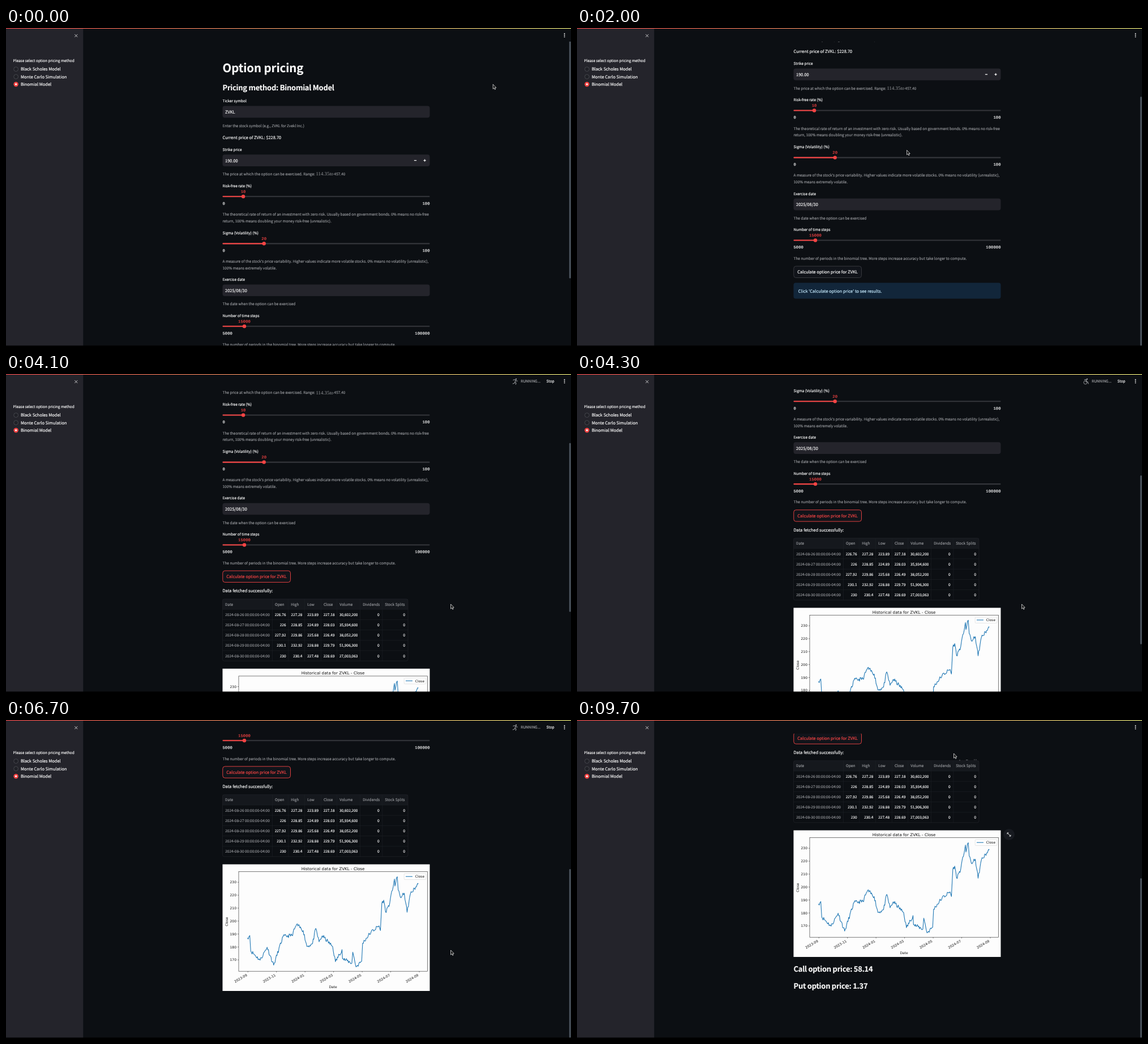
Recreate the animation shown at these times as an HTML page. Size 998 px wide and 561 px high, loop 9.8 s.

```html
<!DOCTYPE html>
<html lang="en">
<head>
<meta charset="utf-8">
<title>Option pricing</title>
<style>
  html, body { margin: 0; width: 100%; height: 100%; overflow: hidden; background: #0c0f13; }
  svg { display: block; width: 100vw; height: 100vh; text-rendering: geometricPrecision; }
  text { font-family: "Noto Sans CJK JP", "Noto Sans CJK SC", "Noto Sans CJK", "Open Sans", sans-serif; white-space: pre; }
  .mono { font-family: "Liberation Mono", monospace; }
  .plot { font-family: "DejaVu Sans", sans-serif; }
  .math { font-family: "Liberation Serif", serif; }
</style>
</head>
<body>
<svg id="stage" viewBox="0 0 998 561"></svg>
<script>
const LOOP = 9800, STEP = 100;
const WHITE = '#fafafa', GREY = '#95979b', RED = '#f54444', PANEL = '#24242b', BG = '#0c0f13', BLUE = '#1f77b4';
const SMALL = 7.28, BODY = 8.32, HEAD = 14.56, TITLE = 22.88;
const LEFT = 382.5, RIGHT = 748.5, TICKER = 'ZVKL';

// ---- drawing helpers; y of a text is the middle of its capitals ----
const rect = (x, y, w, h, fill, more = '') =>
  `<rect x="${x}" y="${y}" width="${w}" height="${h}" fill="${fill}" ${more}/>`;
const line = (d, stroke, width, more = '') =>
  `<path d="${d}" fill="none" stroke="${stroke}" stroke-width="${width}" ${more}/>`;
const circle = (x, y, r, fill, more = '') => `<circle cx="${x}" cy="${y}" r="${r}" fill="${fill}" ${more}/>`;
const group = (id, body, more = '') => `<g id="${id}" ${more}>${body}</g>`;
const raw = (x, y, s, size, fill, more) =>
  `<text x="${x}" y="${y}" font-size="${size}" fill="${fill}" ${more}>${s}</text>`;
// a hairline outline gives the slightly heavier weight of light text on dark
const text = (x, y, s, size = SMALL, fill = WHITE, more = '') =>
  raw(x, y + size * .34, s, size / 1.117, fill, `stroke="${fill}" stroke-width=".17" ${more}`);
const mono = (x, y, s, fill, anchor) =>
  raw(x, y + 2.4, s, SMALL, fill, `class="mono" text-anchor="${anchor}" stroke="${fill}" stroke-width=".17"`);
const plot = (x, y, s, size = 6, more = '', anchor = 'middle') =>
  raw(x, y + size * .365, s, size, '#111', `class="plot" text-anchor="${anchor}" ${more}`);
const heading = (y, s) => text(LEFT, y, s, HEAD, WHITE, 'font-weight="700" letter-spacing="-.28"');
const caption = (y, ...rows) => rows.map((s, i) => text(LEFT, y + i * 11.5, s, SMALL, GREY)).join('');
const field = (y, label, value) => text(LEFT, y, label) +
  rect(LEFT, y + 8.6, RIGHT - LEFT, 20.7, PANEL, 'rx="4"') + text(387, y + 19, value, BODY);

function slider(y, label, min, max, value) {
  const x = LEFT + (RIGHT - LEFT) * (value - min) / (max - min), track = y + 19;
  return text(LEFT, y, label) + mono(x, y + 10.5, value, RED, 'middle') +
    rect(LEFT, track - 1, RIGHT - LEFT, 2.1, '#34363b', 'rx="1"') +
    rect(LEFT, track - 1, x - LEFT, 2.1, RED, 'rx="1"') + circle(x, track, 3.2, RED) +
    mono(LEFT, y + 31.2, min, WHITE, 'start') + mono(RIGHT, y + 31.2, max, WHITE, 'end');
}

function table(top) {
  const row = 18.2, edges = [382.5, 470.5, 498.7, 527.6, 556.3, 584.7, 625.6, 664.7, 710];
  const heads = ['Date', 'Open', 'High', 'Low', 'Close', 'Volume', 'Dividends', 'Stock Splits'];
  const rows = [
    '26 226.76 227.28 223.89 227.18 30,602,200',
    '27 226 228.85 224.89 228.03 35,934,600',
    '28 227.92 229.86 225.68 226.49 38,052,200',
    '29 230.1 232.92 228.88 229.79 51,906,300',
    '30 230 230.4 227.48 228.69 27,003,063'];
  let out = rect(LEFT, top, 327.5, row, '#15181d');
  heads.forEach((s, i) => out += text(edges[i] + 4.6, top + 9.2, s, SMALL, GREY));
  rows.forEach((r, n) => {
    const y = top + row * (n + 1) + 9.2, [day, ...cells] = r.split(' ');
    out += text(387.2, y, `2024-08-${day} 00:00:00-04:00`, SMALL, GREY);
    [...cells, 0, 0].forEach((s, i) =>
      out += text(edges[i + 2] - (i > 4 ? 5 : 4.2), y, s, SMALL, WHITE, 'text-anchor="end"'));
  });
  let grid = '';
  for (let n = 1; n < 6; n++) grid += `M${LEFT} ${top + row * n}H710`;
  edges.slice(1, -1).forEach(x => grid += `M${x} ${top}v${row * 6}`);
  return out + line(grid, '#202329', .55) +
    rect(LEFT, top, 327.5, row * 6, 'none', 'rx="3" stroke="#25282e" stroke-width=".6"');
}

// turning points of the price: [day, close], joined by a seeded random walk
const turns = [
  [-1, 187], [4, 188.8], [6, 177], [26, 169.8], [41, 179.8], [55, 166], [75, 188], [94, 189], [104, 197.3],
  [118, 192.7], [126, 180.4], [138, 182.5], [145, 194.3], [152, 184], [159, 188.6], [181, 180.2], [187, 168.6],
  [201, 178], [202, 171], [222, 167.5], [224, 176], [231, 164.6], [243, 169], [245, 182.9], [263, 191.5],
  [280, 196.3], [283, 192.7], [286, 213.8], [290, 216.2], [294, 207], [303, 214], [313, 232.5], [314, 227.1],
  [319, 234.3], [321, 224], [327, 218], [334, 221.6], [340, 206.8], [347, 221], [364, 228.8]];

function priceCurve(toX, toY) {
  let seed = 11;
  const random = () => (seed = seed * 16807 % 2147483647) / 2147483647 - .5;
  let d = '';
  turns.forEach(([day, price], i) => {
    const [next, target] = turns[i + 1] || [day + 1, price];
    const n = Math.max(1, Math.round((next - day) / 1.45));
    for (let k = 0; k < n; k++) {
      const p = price + (target - price) * k / n + (k && 3 * random());
      d += `${d ? 'L' : 'M'}${toX(day + (next - day) * k / n).toFixed(2)} ${toY(p).toFixed(2)}`;
    }
  });
  return d;
}

function chart(top) {
  const dayX = d => 427.3 + d * .827, priceY = p => top + 168.6 - (p - 170) * 2.282, base = top + 188.6;
  let out = rect(LEFT, top, RIGHT - LEFT, 223.4, '#fdfdfd'), ticks = '';
  for (let p = 170; p <= 230; p += 10) {
    ticks += `M411 ${priceY(p)}h-2.1`;
    out += plot(407, priceY(p), p, 6, '', 'end');
  }
  for (let i = 0; i < 7; i++) {
    const month = new Date(Date.UTC(2023, 8 + i * 2, 1)).toISOString().slice(0, 7);
    const x = 427.3 + i * 50.45, y = top + 201;
    ticks += `M${x} ${base}v2.1`;
    out += plot(x - 12.8, y, month, 6, `transform="rotate(-30 ${x - 12.8} ${y})"`);
  }
  return out + line(ticks, '#111', .5) + line(priceCurve(dayX, priceY), BLUE, 1.1, 'stroke-linejoin="round"') +
    rect(411, top + 13.1, 333.5, 175.5, 'none', 'stroke="#111" stroke-width=".55"') +
    rect(703.3, top + 16.5, 38.5, 10.4, '#fff', 'rx="1" stroke="#ccc" stroke-width=".5"') +
    line(`M706 ${top + 21.5}h12`, BLUE, 1.1) + plot(722.8, top + 21.5, 'Close', 6, '', 'start') +
    plot(577.6, top + 7.5, `Historical data for ${TICKER} - Close`, 7.19) +
    plot(577.6, top + 216, 'Date') +
    plot(390, top + 101, 'Close', 6, `transform="rotate(-90 390 ${top + 101})"`);
}

const button = (id, ink, border) => group(id,
  rect(382.8, 571.9, 119.7, 20.3, '#11141a', `rx="4" stroke="${border}" stroke-width=".9"`) +
  text(442.6, 582.2, `Calculate option price for ${TICKER}`, BODY, ink, 'text-anchor="middle"'));

const page =
  text(LEFT, 70.4, 'Option pricing', TITLE, WHITE, 'font-weight="700" letter-spacing="-.11"') +
  heading(105.5, 'Pricing method: Binomial Model') +
  field(129, 'Ticker symbol', TICKER) +
  caption(172.7, `Enter the stock symbol (e.g., ${TICKER} for Zvekl Inc.)`) +
  text(LEFT, 193.1, `Current price of ${TICKER}: $228.70`, BODY) +
  field(214.7, 'Strike price', '190.00') +
  line('M720.9 233.6h4.2M737.5 233.6h4.2M739.6 231.5v4.2', WHITE, 1.1) +
  caption(257.8, 'The price at which the option can be exercised. Range:') +
  raw(547.5, 260.4, '114.35<tspan font-style="italic">to</tspan>', 8.8, GREY, 'class="math"') +
  text(579.6, 257.8, '457.40', SMALL, GREY) +
  slider(278.2, 'Risk-free rate (%)', 0, 100, 10) +
  caption(329, 'The theoretical rate of return of an investment with zero risk. Usually based on government bonds. 0% means no risk-free',
    'return, 100% means doubling your money risk-free (unrealistic).') +
  slider(361.3, 'Sigma (Volatility) (%)', 0, 100, 20) +
  caption(411.7, "A measure of the stock's price variability. Higher values indicate more volatile stocks. 0% means no volatility (unrealistic),",
    '100% means extremely volatile.') +
  field(443.8, 'Exercise date', '2025/08/30') +
  caption(487, 'The date when the option can be exercised') +
  slider(507.2, 'Number of time steps', 5000, 100000, 15000) +
  caption(558.1, 'The number of periods in the binomial tree. More steps increase accuracy but take longer to compute.') +
  button('idle', WHITE, '#3b3d42') + button('active', RED, RED) +
  group('info', rect(LEFT, 601.2, RIGHT - LEFT, 28.1, '#12263a', 'rx="4"') +
    text(390.8, 615.4, "Click 'Calculate option price' to see results.", BODY, '#c7ebff')) +
  group('data', text(LEFT, 606.8, 'Data fetched successfully:', BODY) + table(621.8)) +
  group('chart', chart(744.6)) +
  group('prices', heading(989.5, 'Call option price: 58.14') + heading(1019, 'Put option price: 1.37')) +
  group('expand', circle(763, 752, 10, '#171a20') +
    line('M760.3 749.3l5.4 5.4M760 751.5v-2.5h2.5M766 752.5v2.5h-2.5', WHITE, .9)) +
  group('tools', line('M675 621h2M687 620.5h3.5M701 620h1.8M704 620h1.8', GREY, .9), 'opacity=".7"');

const radio = (y, label, on) => (on
  ? circle(17.6, y, 4.2, RED) + circle(17.6, y, 1.6, '#fff')
  : circle(17.6, y, 3.9, '#202127', 'stroke="#55565c" stroke-width=".7"')) + text(25.9, y, label, BODY);

const sidebar = rect(0, 0, 136.3, 561, PANEL) +
  line('M121.3 11.1l5 5m0-5l-5 5', '#d8d8da', .9) +
  text(12.5, 57.3, 'Please select option pricing method') +
  radio(72.6, 'Black Scholes Model') + radio(85.9, 'Monte Carlo Simulation') + radio(99.2, 'Binomial Model', true);

const header = rect(136, 0, 862, 24, BG) +
  [10, 12.8, 15.6].map(y => circle(986.5, y, .95, WHITE)).join('') +
  group('running',
    group('runner', circle(901, 8.9, 1.2, GREY) +
      line('M895.5 11l2.5-1.2 2.6 1.2-1.8 3.4 2.2 1.4-.8 3M898.8 14.4l-1 2-3 .8M900.6 11l1.2 1.5 1.8-.4', GREY, 1.1)) +
    group('wheel', circle(901, 8.9, 1.2, GREY) + circle(898, 15, 3, 'none', `stroke="${GREY}" stroke-width=".9"`) +
      line('M896 10.5l2.5-.8 1.8 1-1.3 3h3l1.5 3.8', GREY, 1.1)) +
    text(909.3, 12.8, 'RUNNING...', SMALL, '#a3a4a8') + text(954.6, 12.8, 'Stop'));

const arrow = '<path d="M0 0V8.2L1.9 6.5 3.2 9.3 4.5 8.7 3.3 6H5.7Z" fill="#111" stroke="#fff" stroke-width=".7"/>';
const hand = '<path d="M.7 .9Q1.5 0 2 1V3.2L4.9 3.8Q5.9 4 5.6 5.5L5 8.3H1.6L-.8 5.2Q-.5 4.2 .7 5Z" fill="#111" stroke="#fff" stroke-width=".8"/>';

document.getElementById('stage').innerHTML =
  '<defs><linearGradient id="strip"><stop stop-color="#ff4b4b"/><stop offset="1" stop-color="#fffd80"/></linearGradient></defs>' +
  group('page', page) + rect(994.8, 0, 2.9, 10, '#4b535c', 'id="thumb" rx="1.4"') + header + sidebar +
  rect(0, 0, 998, 1.1, 'url(#strip)') + rect(0, 560.2, 998, .8, '#000') +
  group('cursor', group('arrow', arrow) + group('hand', hand));

// ---- motion ----
const $ = id => document.getElementById(id);
const show = (id, on) => $(id).setAttribute('display', on ? 'inline' : 'none');
const smooth = (t, a, b) => { const p = Math.min(1, Math.max(0, (t - a) / (b - a))); return p * p * (3 - 2 * p); };
// moves: [begin, end, value reached]
const follow = (t, start, moves) => moves.reduce((v, [a, b, to]) => v + (to - v) * smooth(t, a, b), start);

const scrolls = [[490, 1600, 151.7], [3830, 4730, 490], [7000, 7700, 550]];
const cursorX = [[100, 700, 582.6], [2000, 2600, 487.5], [3300, 3900, 785.6], [9200, 9700, 665.5]];
const cursorY = [[100, 700, 215.5], [2000, 2600, 429], [3300, 3900, 406], [9200, 9700, 59]];

function draw(t) {
  const fetched = t >= 3500, done = t >= 6800, hover = t >= 2500;
  const scroll = follow(t, 0, scrolls);
  $('page').setAttribute('transform', `translate(0 ${-scroll})`);

  const view = 559, total = view + (done ? 550 : fetched ? 490 : 151.7);
  $('thumb').setAttribute('y', 2 + scroll * view / total);
  $('thumb').setAttribute('height', view * view / total);

  show('idle', !hover);
  show('active', hover);
  show('info', !fetched);
  show('data', fetched);
  show('chart', t >= 3600);
  show('prices', done);
  show('expand', t >= 9400);
  show('tools', t >= 9700);

  const wheel = Math.floor(t / 300) % 3 === 2;
  show('wheel', wheel);
  show('runner', !wheel);
  $('running').setAttribute('opacity', done || t < 3200 ? 0 : t < 3300 ? .18 : 1);

  const onButton = hover && t < 3500;
  show('hand', onButton);
  show('arrow', !onButton);
  $('cursor').setAttribute('transform', `translate(${follow(t, 860.2, cursorX)} ${follow(t, 99.3, cursorY)})`);
}

function tick() {
  draw(Math.floor(performance.now() % LOOP / STEP) * STEP);
  requestAnimationFrame(tick);
}
tick();
</script>
</body>
</html>
```
